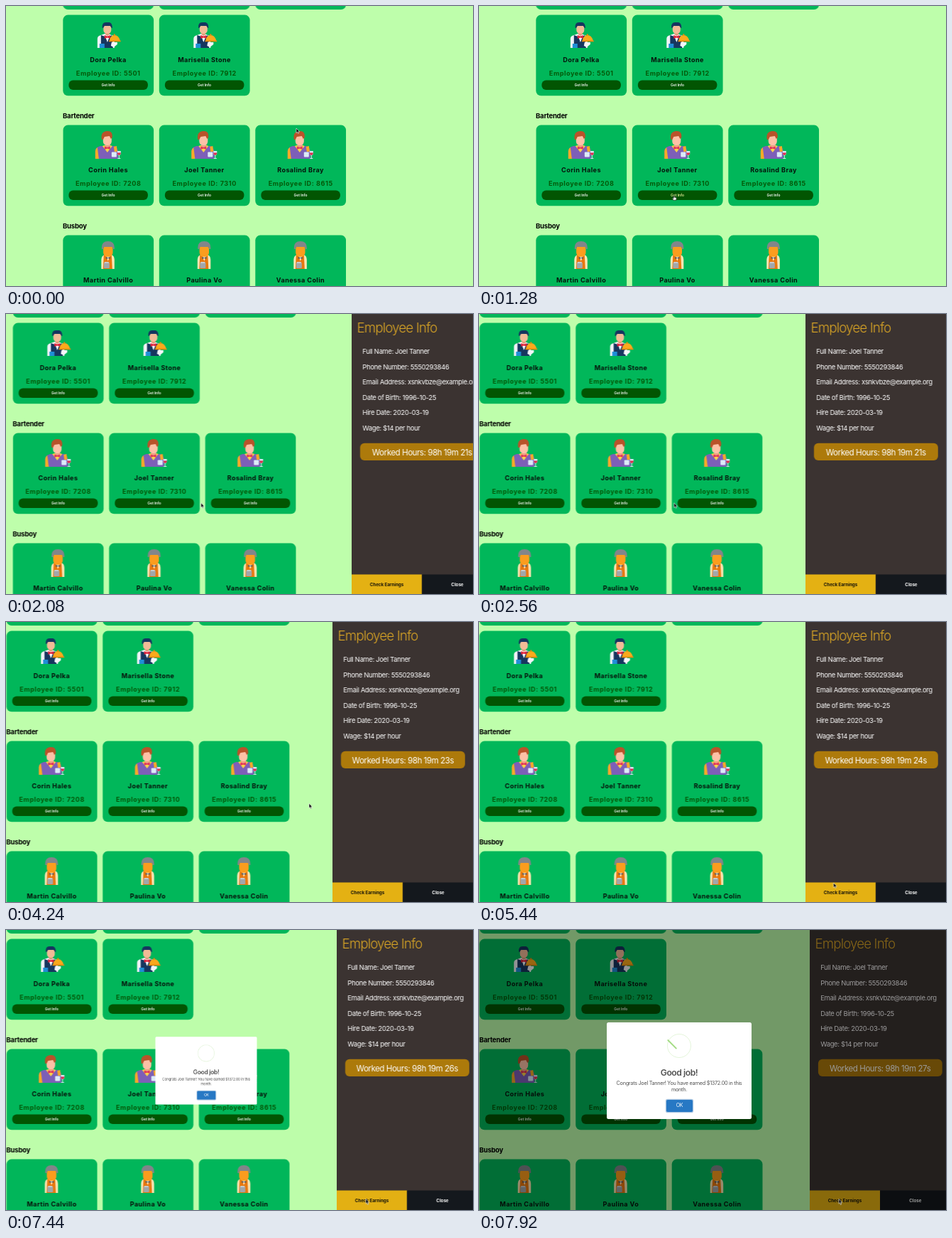
Animation of 658 by 394 pixels, one loop 8000 ms. Source, as an HTML page:

```html
<!DOCTYPE html>
<html lang="en">
<head>
<meta charset="utf-8">
<title>Employee list</title>
<style>
html, body { margin: 0; width: 100%; height: 100%; overflow: hidden; background: #befeab; }
body { position: relative; font-family: Inter, "Open Sans", sans-serif; }
#stage { position: absolute; left: 0; top: 0; width: 658px; height: 394px; overflow: hidden; }
#stage > svg { position: absolute; left: 0; top: 0; }

#list, #panel, #nudge, #shade, #alert, #pointer, .arrow, .hand, .hover, .tip, .long {
  animation: 8s linear infinite;
}

/* Cards */
.mid { text-anchor: middle; }
.head { font-size: 9.5px; font-weight: 700; letter-spacing: -.2px; }
.name { font-size: 9.1px; font-weight: 700; letter-spacing: .4px; fill: #07140c; }
.id { font-size: 9.1px; font-weight: 700; letter-spacing: .55px; fill: #055a0a; }
.get { font-size: 5px; font-weight: 600; fill: #fff; }
.hover { animation-name: hover; animation-timing-function: step-end; }
@keyframes hover { 0% { fill: #fff; } 12.5% { fill: #e9ee9a; } 23.25%, 100% { fill: #fff; } }

#list { animation-name: list; }
@keyframes list {
  0%, 22.25% { transform: translateX(80.3px); animation-timing-function: ease; }
  28.5%, 100% { transform: translateX(.7px); }
}

/* Side panel */
#panel { animation-name: panel; }
@keyframes panel {
  0%, 22.45% { transform: translateX(658px); animation-timing-function: ease; }
  28.7%, 100% { transform: translateX(459.7px); }
}
#nudge { animation-name: nudge; animation-timing-function: step-end; }
@keyframes nudge { 0% { transform: none; } 93%, 100% { transform: translateX(6px); } }
.title { font-size: 18.7px; font-weight: 300; letter-spacing: -.045em; fill: #dca725; }
.row { font-size: 9.45px; letter-spacing: -.036em; fill: #fff; }
.hours { font-size: 11.5px; letter-spacing: -.037em; fill: #fff; }
.btn { font-size: 6.2px; font-weight: 700; }

/* Alert */
#shade { position: absolute; inset: 0; background: rgba(0, 0, 0, .4); animation-name: shade; }
@keyframes shade { 0%, 93% { opacity: 0; } 94.25%, 100% { opacity: 1; } }
#alert {
  position: absolute; left: 180px; top: 129.5px; width: 204px; height: 135.5px;
  border-radius: 2.5px; background: #fff; color: #545454; text-align: center;
  animation-name: pop;
}
@keyframes pop {
  0% { transform: scale(.7); opacity: 0; animation-timing-function: step-end; }
  93% { transform: scale(.7); opacity: 1; animation-timing-function: ease; }
  94.6875% { transform: scale(1.05); animation-timing-function: ease; }
  96% { transform: scale(.95); animation-timing-function: ease; }
  96.75%, 100% { transform: none; opacity: 1; }
}
#alert > * { position: absolute; letter-spacing: -.04em; }
#alert h2 { margin: 0; left: 0; width: 100%; top: 62.5px; font-size: 12.2px; line-height: 16px; font-weight: 600; }
#alert p { margin: 0; left: 0; width: 100%; top: 82.1px; font-size: 7.3px; line-height: 8.4px; white-space: nowrap; }
#alert b {
  left: 84.3px; top: 108.8px; width: 36.4px; height: 16.8px; border-radius: 1.8px;
  background: #2778c4; box-shadow: 0 0 0 1.3px rgba(100, 150, 200, .5);
  color: #fff; font-size: 6.9px; line-height: 16.8px; font-weight: 400;
}
.icon {
  left: 84.6px; top: 15.6px; width: 5em; height: 5em; font-size: 6.5px;
  border: .25em solid rgba(165, 220, 134, .3); border-radius: 50%;
}
.icon i { position: absolute; height: .3125em; border-radius: .125em; background: #a5dc86; }
.tip { transform: rotate(45deg); animation-name: tip; }
.long { transform: rotate(-45deg); animation-name: long; }
@keyframes tip {
  0%, 93% { top: 1.1875em; left: .0625em; width: 0; }
  98.0625% { top: 1.0625em; left: .125em; width: 0; animation-timing-function: ease; }
  99.5625% { top: 2.1875em; left: -.375em; width: 3.125em; }
  100% { top: 2.64em; left: .55em; width: 2em; }
}
@keyframes long {
  0%, 99.094% { top: 3.375em; right: 2.875em; width: 0; }
  100% { top: 2.565em; right: .54em; width: 2.8em; }
}

/* Pointer */
#pointer { animation-name: move; }
@keyframes move {
  0%, 1% { transform: translate(409px, 172px); animation-timing-function: ease-in-out; }
  13.5%, 38% { transform: translate(274.7px, 265.7px); animation-timing-function: ease-in-out; }
  49%, 57% { transform: translate(427px, 255.3px); animation-timing-function: ease-in-out; }
  71%, 100% { transform: translate(507px, 378.5px); }
}
.arrow, .hand { animation-timing-function: step-end; }
.arrow { animation-name: arrow; }
.hand { animation-name: hand; }
@keyframes arrow { 0% { opacity: 1; } 12.5% { opacity: 0; } 23.5% { opacity: 1; } 69% { opacity: 0; } 93%, 100% { opacity: 1; } }
@keyframes hand { 0% { opacity: 0; } 12.5% { opacity: 1; } 23.5% { opacity: 0; } 69% { opacity: 1; } 93%, 100% { opacity: 0; } }
</style>
</head>
<body>
<div id="stage">
  <svg width="658" height="394" viewBox="0 0 658 394">
    <defs>
      <g id="waiter">
        <path d="M-15 46V33q0-4 5-5l8-3 7 3q4 1 4 5v13z" fill="#f1f3f7"/>
        <path d="M-10 28l6 2 3 7 3-7 3-2 2 18H-10z" fill="#16365f"/>
        <path d="M-4 28l3 10 4-10z" fill="#fff"/>
        <path d="M-12 40h7v6h-7z" fill="#1f8fd6"/>
        <path d="M-4 22h6v5l-3 2-3-2z" fill="#dd9a76"/>
        <rect x="-6.500" y="13" width="11" height="13" rx="5" fill="#f2bb97"/>
        <path d="M-8 18q-1-8 5-8h5q4 1 4 8h-1l-2-3h-8l-2 3z" fill="#16365f"/>
        <path d="M-5 28l4 1.500 4-1.500v5l-4-1.500-4 1.500z" fill="#e2263d"/>
        <path d="M2 36q1-8 7-8t8 8z" fill="#fba91c"/>
        <circle cx="9" cy="27.500" r="1.200" fill="#e28a10"/>
        <rect x="1" y="35.500" width="17" height="1.800" rx=".9" fill="#e98c10"/>
        <path d="M5 38h8v3l-5 4-4-2z" fill="#f4f6fa"/>
      </g>
      <g id="bartender">
        <path d="M-18 47V36q0-5 7-7h20q5 2 5 9v9z" fill="#7d5fb8"/>
        <path d="M-18 47V36q0-3 3-5l2 16z" fill="#f6ab27"/>
        <path d="M-8 29l7 9 7-9-3-1h-8z" fill="#fbd34a"/>
        <path d="M-4 25h7v5l-3 2-4-2z" fill="#eda184"/>
        <rect x="-7" y="13" width="12" height="15" rx="5.500" fill="#fdc1a6"/>
        <path d="M-9 20q-2-11 7-12 9-1 8 9l-2 2-2-4-7 1-2 4z" fill="#b9532a"/>
        <path d="M-5 29.500l4 1.500 4-1.500v4.500l-4-1.500-4 1.500z" fill="#e2315c"/>
        <path d="M8 30l4-1 1 8H9z" fill="#f6ab27"/>
        <rect x="5" y="37.500" width="7" height="7" rx="1" fill="#dcebf8"/>
        <path d="M13 36h5v3q0 3-2 3.500V46h1.500v1h-4v-1H15v-3.500q-2-.5-2-3.500z" fill="#d7e6f2"/>
        <path d="M13 38.500h5q0 3-2.500 3.500-2.500-.5-2.500-3.500z" fill="#dc2d4e"/>
      </g>
      <g id="busboy">
        <path d="M-9.500 47V34q0-6 5.500-7h8q5 1 5 7v13z" fill="#fbe6b4"/>
        <path d="M-6 27h11l1 20H-7z" fill="#e8780f"/>
        <path d="M-3 27h6l-3 9z" fill="#fff3d6"/>
        <rect x="-6.700" y="13" width="13.400" height="17" rx="6" fill="#fb9d1e"/>
        <path d="M-9 17q0-9 9-9t9 9v2H7l-1-3H-6l-1 3h-2z" fill="#82868a"/>
        <path d="M-3 30l3 1.300 3-1.300v3l-3-1.300-3 1.300z" fill="#53585c"/>
        <rect x="-6" y="38" width="8" height="8" rx="1" fill="#a2a7ab"/>
        <rect x="-5" y="37" width="6" height="2" fill="#c7cbce"/>
      </g>
    </defs>
    <g id="list"></g>
    <g id="panel"><g id="nudge">
      <rect width="200" height="394" fill="#3b3331"/>
      <text class="title" x="7.800" y="26.200">Employee Info</text>
      <g id="rows"></g>
      <rect x="12.200" y="181.700" width="174.800" height="24.200" rx="6" fill="#ad7a0b"/>
      <text class="hours mid" x="99.500" y="198.700" id="hours"></text>
      <rect y="366.500" width="99.300" height="28" fill="#e4b113"/>
      <rect x="99.300" y="366.500" width="100.700" height="28" fill="#14181d"/>
      <text class="btn mid" x="49.700" y="383.300" fill="#15120a">Check Earnings</text>
      <text class="btn mid" x="149.200" y="383.300" fill="#fff">Close</text>
    </g></g>
  </svg>
  <div id="shade"></div>
  <div id="alert">
    <div class="icon"><i class="tip"></i><i class="long"></i></div>
    <h2>Good job!</h2>
    <p>Congrats Joel Tanner! You have earned $1372.00 in this<br>month.</p>
    <b>OK</b>
  </div>
  <svg width="658" height="394" viewBox="0 0 658 394">
    <g id="pointer" stroke-width=".6" stroke-linejoin="round">
      <path class="arrow" d="M0 0V6.600L1.500 5.300 2.500 7.600 3.600 7.100 2.600 4.900H4.600z" fill="#000" stroke="#fff"/>
      <path class="hand" d="M-.7 1.400Q0 .6.700 1.400V3.300L3 3.800Q3.600 4 3.500 4.800L3 7.600H-.7L-2.400 5.100Q-2.300 4.100-.7 5z" fill="#fff" stroke="#000"/>
    </g>
  </svg>
</div>
<script>
const $ = id => document.getElementById(id);
const STEP = 135.5;
const ACTIVE = "Joel Tanner";

const plate = (x, y) =>
  `<rect x="${x}" y="${y - .4}" width="127.8" height="113.6" rx="7" fill="#01b75a"/>`;

function card(col, y, icon, name, id) {
  const hover = name === ACTIVE ? " hover" : "";
  return `<g transform="translate(${col * STEP} ${y})">
    ${plate(0, 0)}
    <use href="#${icon}" x="63.5"/>
    <text class="name mid" x="63.700" y="66">${name}</text>
    <text class="id mid" x="63.900" y="85.400">Employee ID: ${id}</text>
    <rect x="8.100" y="91.400" width="111.500" height="13.700" rx="6" fill="#025502"/>
    <text class="get mid${hover}" x="63.700" y="100.200">Get Info</text>
  </g>`;
}

const groups = [
  { y: 13, icon: "waiter", staff: [["Dora Pelka", 5501], ["Marisella Stone", 7912]] },
  { title: "Bartender", y: 168, icon: "bartender",
    staff: [["Corin Hales", 7208], [ACTIVE, 7310], ["Rosalind Bray", 8615]] },
  { title: "Busboy", y: 323, icon: "busboy",
    staff: [["Martin Calvillo", 4127], ["Paulina Vo", 6034], ["Vanessa Colin", 2958]] }
];

// Lower edges of the row above
let html = [0, 1, 2].map(i => plate(i * STEP, -108.2)).join("");
for (const g of groups) {
  if (g.title) html += `<text class="head" x="-.3" y="${g.y - 9.8}">${g.title}</text>`;
  html += g.staff.map(([name, id], i) => card(i, g.y, g.icon, name, id)).join("");
}
$("list").innerHTML = html;

$("rows").innerHTML = [
  "Full Name: " + ACTIVE,
  "Phone Number: 5550293846",
  "Email Address: xsnkvbze@example.org",
  "Date of Birth: 1996-10-25",
  "Hire Date: 2020-03-19",
  "Wage: $14 per hour"
].map((s, i) => `<text class="row" x="15.500" y="${56.2 + i * 21.55}">${s}</text>`).join("");

const start = performance.now();
function tick() {
  const t = (performance.now() - start) % 8000;
  const sec = 21 + Math.max(0, Math.floor((t - 1700) / 1000));
  const label = `Worked Hours: 98h 19m ${sec}s`;
  if ($("hours").textContent !== label) $("hours").textContent = label;
  requestAnimationFrame(tick);
}
tick();
</script>
</body>
</html>
```
